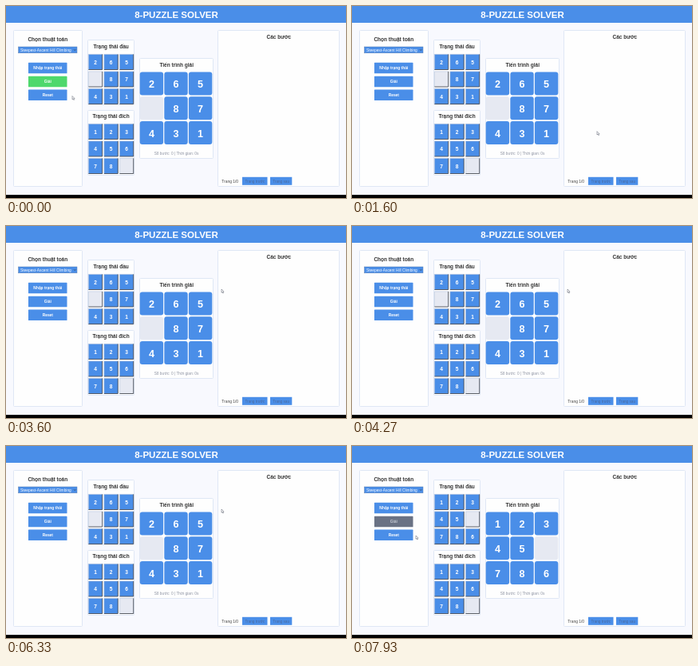
An HTML page that plays this animation: 426 by 240 pixels, repeating every 8000 ms.

```html
<!DOCTYPE html>
<html lang="vi">
<head>
<meta charset="utf-8">
<title>8-Puzzle Solver</title>
<style>
  html, body { margin: 0; width: 100%; height: 100%; overflow: hidden; background: #f8f9fe; }
  svg { display: block; width: 100%; height: 100%; }
  text { font-family: "Liberation Sans", Arial, sans-serif; }
</style>
</head>
<body>
<svg id="stage" viewBox="0 0 426 240"></svg>
<script>
const stage = document.getElementById('stage');
const BLUE = [74, 142, 232], GREEN = [78, 216, 108], GREY = [106, 114, 132];
const EMPTY = '#e6e9f2', DURATION = 8000;
const rgb = c => `rgb(${c.map(Math.round)})`;

function add(tag, attrs, content = '') {
  const node = document.createElementNS('http://www.w3.org/2000/svg', tag);
  for (const key in attrs) node.setAttribute(key, attrs[key]);
  node.textContent = content;
  return stage.appendChild(node);
}

const rect = (x, y, width, height, fill, more = {}) =>
  add('rect', { x, y, width, height, fill, ...more });

const label = (content, x, y, size, fill, weight = 'bold', anchor = 'middle') =>
  add('text', { x, y, fill, 'font-size': size, 'font-weight': weight, 'text-anchor': anchor }, content);

const heading = (content, x, y) => label(content, x, y, 6.5, '#333');

const panel = (x, y, w, h) =>
  rect(x, y, w, h, '#fefefe', { stroke: '#dfe7f5', rx: 1 });

function button(content, y) {
  const box = rect(28, y, 48.5, 13.5, rgb(BLUE), { rx: 0.6 });
  const text = label(content, 52.3, y + 8.6, 4.9, '#fff');
  return { box, text };
}

// Returns a function that writes nine digits into the board; 0 is the gap.
function board(x, y, pitchX, pitchY, w, h, size, beveled) {
  const cells = Array.from({ length: 9 }, (_, i) => {
    const left = x + i % 3 * pitchX, top = y + Math.floor(i / 3) * pitchY;
    const box = rect(left, top, w, h, rgb(BLUE), { rx: beveled ? 0 : 3 });
    if (beveled) {
      const right = left + w, bottom = top + h;
      add('path', { d: `M${left} ${bottom}V${top}H${right}`, fill: 'none', stroke: '#b4c3da', 'stroke-width': 0.6 });
      add('path', { d: `M${left} ${bottom}H${right}V${top}`, fill: 'none', stroke: '#4a4e58', 'stroke-width': 0.9 });
    }
    const text = label('', left + w / 2, top + h / 2 + size * 0.4, size, '#fff');
    return { box, text };
  });
  return digits => cells.forEach(({ box, text }, i) => {
    const gap = digits[i] === '0';
    box.setAttribute('fill', gap ? EMPTY : rgb(BLUE));
    text.textContent = gap ? '' : digits[i];
  });
}

rect(0, 0, 426, 240, '#f8f9fe');
rect(0, 0, 426, 21, rgb(BLUE));
label('8-PUZZLE SOLVER', 213.5, 14.8, 11.5, '#fff');
rect(0, 236, 426, 4, '#000');

panel(9.5, 30.5, 86, 195);
panel(102.5, 42.5, 58, 81);
panel(102.5, 130.5, 58, 81);
panel(167.5, 65.5, 92, 125);
panel(265.5, 30.5, 152, 195);

heading('Chọn thuật toán', 52.3, 44.2);
rect(15.5, 51, 73.5, 7.8, rgb(BLUE), { stroke: '#5d7fb0', 'stroke-width': 0.5 });
label('Steepest-Ascent Hill Climbing', 18, 56.8, 4.85, '#fff', 'normal', 'start');
add('path', { d: 'M85 54.3l1.2 1.2 1.2-1.2', fill: 'none', stroke: '#333', 'stroke-width': 0.7 });
const enterButton = button('Nhập trạng thái', 70.8);
const solveButton = button('Giải', 87.8);
button('Reset', 104.6);

heading('Trạng thái đầu', 131.6, 52.6);
heading('Trạng thái đích', 131.6, 139.6);
heading('Tiến trình giải', 213.7, 75.8);
heading('Các bước', 341.8, 40.9);

const setStart = board(103.4, 60.4, 19.5, 21.5, 17.3, 19.1, 6.6, true);
const setGoal = board(103.4, 147.4, 19.5, 21.5, 17.3, 19.1, 6.6, true);
const setProgress = board(167.7, 82.5, 30.6, 30.8, 29.4, 29, 12.6, false);
setGoal('123456780');
label('Số bước: 0 | Thời gian: 0s', 213.5, 185.8, 4.8, '#8d93a2', 'normal');

label('Trang 1/0', 270.3, 220.6, 4.9, '#444', 'normal', 'start');
rect(296, 213.8, 31.5, 10, rgb(BLUE));
rect(331, 213.8, 27.3, 10, rgb(BLUE));
label('Trang trước', 311.8, 220.5, 4.7, '#4a699c', 'normal');
label('Trang sau', 344.6, 220.5, 4.7, '#4a699c', 'normal');

const cursor = add('path', {
  d: 'M0 0V4.3L1 3.4 1.8 5 2.5 4.7 1.8 3.1H3.1Z',
  fill: '#fff', stroke: '#555b68', 'stroke-width': 0.5
});

// Pointer keys: time in ms, x, y
const pointerPath = [
  [0, 83, 112.5], [900, 307, 156.7], [1750, 307, 156.7], [2450, 53, 78],
  [2560, 53, 78], [2720, 54, 96], [2900, 54, 96], [3500, 270, 79],
  [6400, 270, 79], [7050, 54, 78], [7300, 54, 78], [7500, 55, 95],
  [7680, 55, 95], [7900, 80, 112], [8000, 80, 112]
];

const clamp = v => Math.min(1, Math.max(0, v));
const mix = (a, b, p) => a + (b - a) * p;
const pulse = (t, from, to, fade = 180) =>
  Math.min(clamp((t - from) / fade + 1), clamp((to - t) / fade + 1));

function pointerAt(t) {
  const i = pointerPath.findIndex(key => key[0] > t);
  const [t0, x0, y0] = pointerPath[i - 1], [t1, x1, y1] = pointerPath[i];
  const p = (t - t0) / (t1 - t0), eased = p * p * (3 - 2 * p);
  return [mix(x0, x1, eased), mix(y0, y1, eased)];
}

function paintHover(target, amount) {
  target.box.setAttribute('fill', rgb(BLUE.map((c, i) => mix(c, GREEN[i], amount))));
}

function render(t) {
  const digits = t < 7250 ? '265087431' : '123450786';
  setStart(digits);
  setProgress(digits);

  paintHover(enterButton, Math.max(pulse(t, 2500, 2740), pulse(t, 7050, 7340)));
  paintHover(solveButton, Math.max(pulse(t, 0, 120), pulse(t, 2900, 2960, 120), pulse(t, 7540, 7620)));
  const solving = t >= 7620;
  if (solving) solveButton.box.setAttribute('fill', rgb(GREY));
  solveButton.text.setAttribute('fill', solving ? '#c6cad3' : '#fff');

  cursor.setAttribute('transform', `translate(${pointerAt(t)})`);
}

function tick() {
  render(performance.now() % DURATION);
  requestAnimationFrame(tick);
}
tick();
</script>
</body>
</html>
```
